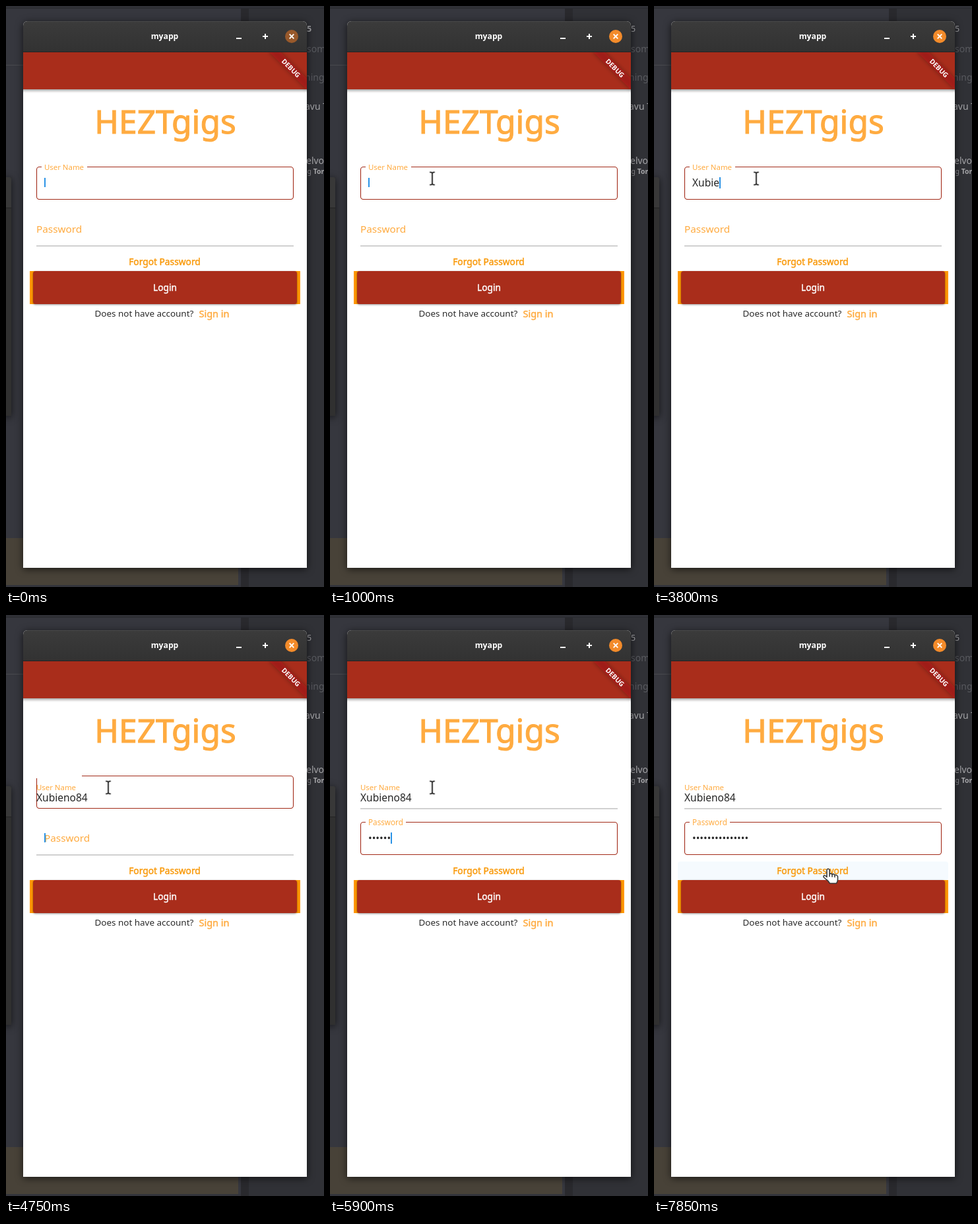
Write an HTML page that moves like this. It is 482 px wide and 879 px high and loops after 8 s.

```html
<!DOCTYPE html>
<html lang="en">
<head>
<meta charset="utf-8">
<title>Login form</title>
<style>
  html, body { margin: 0; width: 100%; height: 100%; overflow: hidden; background: #36373e; }
  svg { display: block; width: 100vw; height: 100vh; }
  text { font-family: "Noto Sans", "Open Sans", sans-serif; white-space: pre; }
  .medium { stroke-width: .45px; stroke-linejoin: round; }
  .amber { fill: #ffab40; stroke: #ffab40; }
  .label { fill: #ffab40; }
  .input { fill: #262626; font-size: 15.5px; }
  .line { fill: #c6c6c6; }
  .box { fill: none; stroke: #a22a18; stroke-width: 1.1; }
  .window { filter: drop-shadow(0 2px 6px rgba(0, 0, 0, .65)); }
  .bar { filter: drop-shadow(0 2px 2px rgba(0, 0, 0, .4)); }
  .button { filter: drop-shadow(0 1px 1.5px rgba(0, 0, 0, .4)); }
  .ribbon { filter: drop-shadow(0 0 3px rgba(0, 0, 0, .5)); }
  .close { animation: release 8s linear infinite; }
  @keyframes release {
    0%, .6% { fill: #98592b; }
    1.8%, 100% { fill: #f38b2a; }
  }
</style>
</head>
<body>
<svg viewBox="0 0 482 879" preserveAspectRatio="none">
  <defs>
    <clipPath id="view"><rect x="26" y="70" width="430" height="780"/></clipPath>
    <linearGradient id="head" x2="0" y2="1">
      <stop stop-color="#3b3b3b"/><stop offset="1" stop-color="#323232"/>
    </linearGradient>
  </defs>

  <!-- desktop behind the window -->
  <rect width="482" height="879" fill="#36373e"/>
  <rect y="89" width="356" height="1" fill="#48494f"/>
  <rect y="805" width="352" height="71" fill="#484238"/>
  <rect y="876" width="356" height="3" fill="#33343b"/>
  <rect x="356" width="12" height="879" fill="#29292d"/>
  <rect x="368" width="114" height="879" fill="#303136"/>
  <rect width="482" height="3" fill="#303137"/>
  <rect y="3" width="482" height="1" fill="#292a2f"/>
  <g class="window">
    <path d="M-5 259H5q3 0 3 3V620H-5z" fill="#303030"/>
    <path d="M-5 259H5q3 0 3 3V305H-5z" fill="#383838"/>
    <rect y="305" width="8" height="1" fill="#222"/>
  </g>
  <g fill="#a5a5a8" font-size="14">
    <text id="count" x="456" y="39" font-size="12.5">5</text>
    <text x="456" y="70" fill="#595a5f">som</text>
    <text x="453" y="113" fill="#595a5f">ning</text>
    <text x="453" y="157">avu T</text>
    <text x="455" y="239">elvo</text>
    <text x="450" y="254" font-size="10.5" fill="#8b8b8f">ng <tspan font-weight="700" fill="#a5a5a8">Tor</tspan></text>
  </g>

  <!-- window frame -->
  <g class="window">
    <path d="M26 850V30q0-7 7-7H449q7 0 7 7V850z" fill="#fff"/>
  </g>
  <path d="M26 70V30q0-7 7-7H449q7 0 7 7V70z" fill="url(#head)"/>
  <path d="M32 23.5H450" stroke="#4a4a4a"/>
  <rect x="26" y="69" width="430" height="1" fill="#242424"/>
  <text x="240.5" y="50" text-anchor="middle" font-size="12.2" font-weight="700" fill="#fff">myapp</text>
  <path d="M349 49h8M389 46h8M393 42v8" stroke="#fff" stroke-width="2"/>
  <circle class="close" cx="433" cy="46" r="10"/>
  <path d="M429.7 42.7l6.6 6.6m0-6.6l-6.6 6.6" stroke="#fff" stroke-width="1.9"/>

  <g clip-path="url(#view)">
    <rect class="bar" x="20" y="60" width="442" height="66" fill="#a92d1b"/>
    <g transform="translate(456 70) rotate(45)">
      <rect class="ribbon" x="-40" y="28" width="80" height="12" fill="#b71c1c" fill-opacity=".63"/>
      <text y="37.7" text-anchor="middle" font-size="10.2" font-weight="700" fill="#fff">DEBUG</text>
    </g>
  </g>

  <text x="241.5" y="193" text-anchor="middle" font-size="49.6" class="amber" stroke-width="1.1">HEZTgigs</text>

  <!-- user name -->
  <rect id="userLine" class="line" x="46" y="292.2" width="390" height="1.6"/>
  <g id="userBox">
    <rect class="box" x="46.5" y="243.5" width="389" height="49" rx="4"/>
    <rect id="userGap" y="242" fill="#fff"/>
  </g>
  <text id="userLabel" class="label" font-size="11.4">User Name</text>
  <text id="user" class="input"></text>

  <!-- password -->
  <rect id="passLine" class="line" x="46" y="362.2" width="390" height="1.6"/>
  <g id="passBox">
    <rect class="box" x="46.5" y="313.5" width="389" height="49" rx="4"/>
    <rect id="passGap" x="54" y="312" height="3" fill="#fff"/>
  </g>
  <text id="passLabel" class="label" font-size="15.3">Password</text>
  <text id="pass" class="input" x="58" y="342.7" style="font-size:15.1px"></text>
  <rect id="caret" width="2" fill="#2b93e6"/>

  <rect id="hover" x="36" y="373" width="410" height="28" rx="4" fill="#f5fafe"/>
  <text x="240.5" y="392" text-anchor="middle" font-size="13.75" class="medium" fill="#f99a0c" stroke="#f99a0c">Forgot Password</text>
  <rect x="36" y="401" width="410" height="50" fill="#ff9800"/>
  <rect class="button" x="41" y="401" width="400" height="50" rx="4" fill="#a92d1b"/>
  <text x="241" y="431" text-anchor="middle" font-size="13.7" class="medium" fill="#fff" stroke="#fff">Login</text>
  <text x="134.5" y="470" font-size="13.45" fill="#2a2a2a">Does not have account?</text>
  <text x="292.5" y="471" font-size="14.5" class="amber medium">Sign in</text>

  <!-- pointer shapes, hot spot at 0,0 -->
  <g id="mouse" stroke-linejoin="round" stroke-linecap="round">
    <g id="beam" fill="none">
      <path d="M-3-9.5Q0-9.5 0-7.500Q0-9.5 3-9.5M0-8V8M-3 9.500Q0 9.500 0 7.500Q0 9.500 3 9.500" stroke="#d8d8d8" stroke-width="3.6"/>
      <path d="M-3-9.5Q0-9.5 0-7.500Q0-9.5 3-9.5M0-8V8M-3 9.500Q0 9.500 0 7.500Q0 9.500 3 9.500" stroke="#222" stroke-width="1.5"/>
    </g>
    <path id="arrow" d="M0 0V16L4 12.500L6.500 18L9.200 16.800L6.800 11.400H12z" fill="#fff" stroke="#3a3a3a" stroke-width="1.5"/>
    <path id="hand" d="M-2 1.500Q0-1.500 2 1.500V8Q4 6 6 8.500Q8.500 7 10 9.500Q13 8.500 14.500 11.500V16Q14.500 19 12.500 22H2.500Q0 18-3 16L-6.500 13Q-8 10.500-5.500 10Q-4 10-2 12.500zM2 8V11.500M6 8.500V12M10 9.500V12.500" fill="#fff" stroke="#3a3a3a" stroke-width="1.6"/>
  </g>
</svg>
<script>
const LOOP = 8000, STEP = 50, FOCUS = 4750;
const el = id => document.getElementById(id);
const set = (id, attrs) => { for (const k in attrs) el(id).setAttribute(k, attrs[k]); };
const show = (id, on) => { el(id).style.display = on ? '' : 'none'; };
const clamp = v => Math.max(0, Math.min(1, v));
const mix = (a, b, p) => a + (b - a) * p;
const smooth = p => p * p * (3 - 2 * p);

// Each entry: time and text after the key press
const userKeys = [
  [-450, ''], [1250, 'F'], [1500, 'Fu'], [1650, 'Fux'], [2050, 'Fux´'], [2200, 'Fuxé'],
  [2650, 'Fux'], [2800, 'Fu'], [2950, 'F'], [3050, '']
];
[3250, 3550, 3600, 3650, 3800, 3900, 3950, 4100, 4200]
  .forEach((t, i) => userKeys.push([t, 'Xubieno84'.slice(0, i + 1)]));
const passKeys = [[FOCUS, '']];
[5250, 5450, 5550, 5650, 5700, 5900, 6050, 6100, 6300, 6400, 6600, 6700, 6800, 6850, 7250]
  .forEach((t, i) => passKeys.push([t, '•'.repeat(i + 1)]));

const latest = (keys, t) => keys.reduce((a, k) => k[0] <= t ? k : a, keys[0]);

function drawFields(t) {
  const moved = t >= FOCUS;
  const p = clamp((t - FOCUS) / 200), e = smooth(p), swapped = p >= .5;
  const [userTime, name] = latest(userKeys, t);
  const [passTime, dots] = latest(passKeys, t);

  el('user').textContent = name;
  set('user', moved ? { x: 46, y: 281.5 } : { x: 58, y: 272.7 });
  set('userLabel', moved ? { x: 46, y: 265 } : { x: 58, y: 248 });
  set('userGap', moved ? { x: 45, width: 70, height: 5 } : { x: 54, width: 69, height: 3 });
  show('userBox', !swapped);
  show('userLine', swapped);

  el('pass').textContent = dots;
  set('passLabel', { x: moved ? 58 : 46, y: mix(342.7, 318, e), 'font-size': mix(15.3, 11.7, e) });
  set('passGap', { width: 61 * e });
  show('passBox', swapped);
  show('passLine', !swapped);

  const field = el(moved ? 'pass' : 'user'), text = moved ? dots : name;
  const since = t - (moved ? passTime : userTime);
  const top = (moved ? 328 : 258) + (text ? 1 : 2);
  set('caret', {
    x: Math.round(58 + (text ? field.getComputedTextLength() : 0)),
    y: top, height: text ? 17 : 14
  });
  show('caret', since % 1000 < 500 && (t < 4650 || moved));
}

function drawMouse(t) {
  const enter = clamp((t - 400) / 250), leave = smooth(clamp((t - 7600) / 250));
  const x = mix(mix(165, 155, enter), 264, leave);
  const y = mix(mix(185, 261, enter), 384, leave);
  const inField = (y >= 243 && y <= 293) || (y >= 313 && y <= 363);
  const onLink = y >= 373;
  set('mouse', { transform: `translate(${x} ${y})` });
  show('mouse', t >= 400);
  show('beam', inField);
  show('hand', onLink);
  show('arrow', !inField && !onLink);
  el('hover').style.opacity = clamp((t - 7750) / 100);
}

function frame() {
  const t = Math.floor(performance.now() % LOOP / STEP) * STEP;
  drawFields(t);
  drawMouse(t);
  set('count', { 'font-weight': t < 100 ? 700 : 400 });
  requestAnimationFrame(frame);
}
frame();
</script>
</body>
</html>
```
